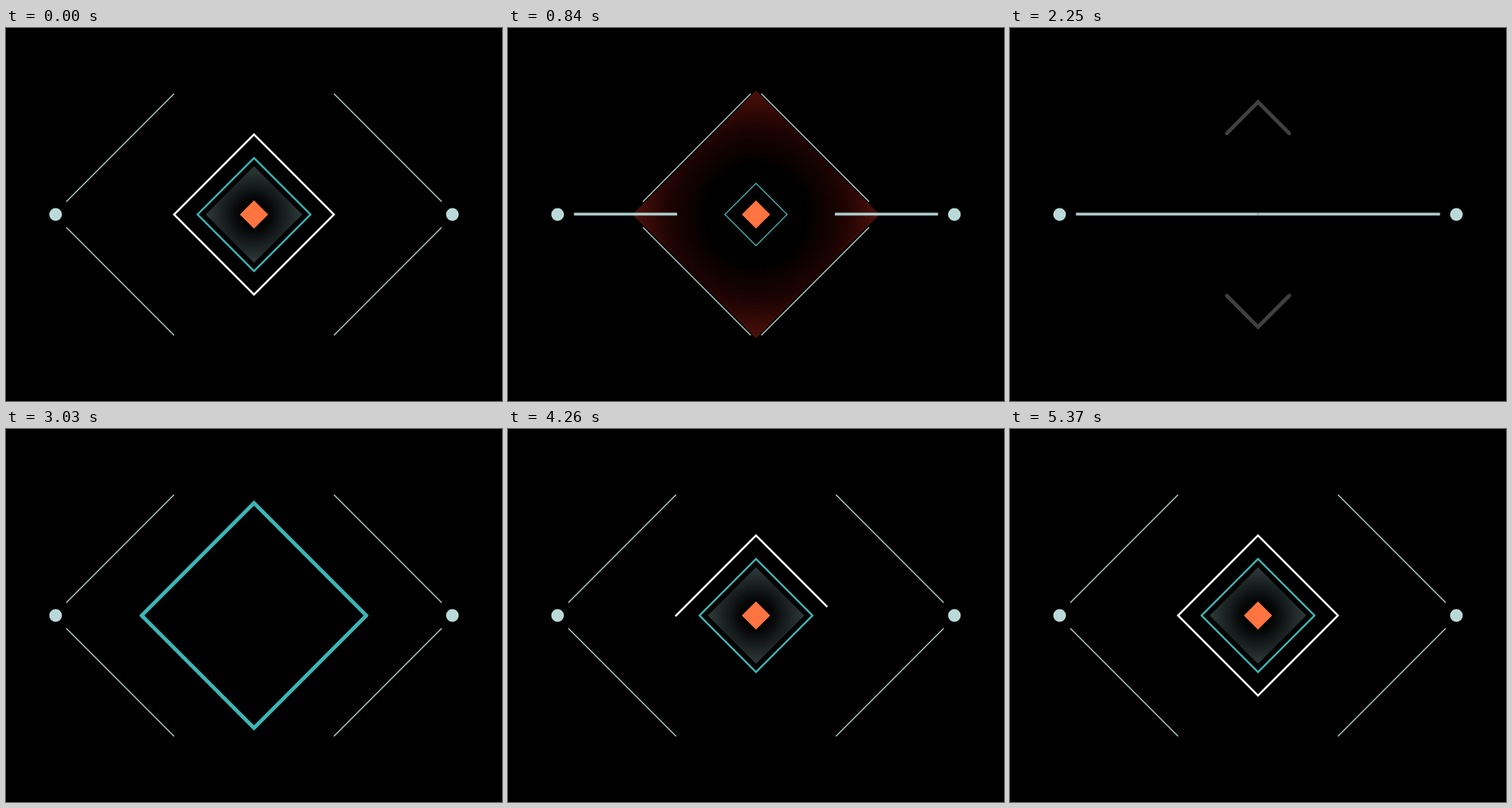
Recreate the animation shown at these times as an HTML page. Size 658x494 px, loop 5.4 s.

```html
<!DOCTYPE html>
<html lang="en">
<head>
<meta charset="utf-8">
<title>Diamond loop</title>
<style>
  html, body { margin: 0; width: 100%; height: 100%; overflow: hidden; background: #000; }
  svg { display: block; width: 100vw; height: 100vh; }
</style>
</head>
<body>
<svg viewBox="0 0 658 494">
  <defs>
    <radialGradient id="ember" gradientUnits="userSpaceOnUse" cx="0" cy="0" r="164">
      <stop offset=".4" stop-color="#000"/>
      <stop offset=".72" stop-color="#1f0403"/>
      <stop offset="1" stop-color="#4d100a"/>
    </radialGradient>
    <radialGradient id="smoke" gradientUnits="userSpaceOnUse" cx="0" cy="0" r="64">
      <stop offset=".25" stop-color="#000"/>
      <stop offset="1" stop-color="#303b3b"/>
    </radialGradient>
  </defs>
  <g id="stage" transform="translate(329 247)" fill="none"></g>
</svg>
<script>
const LOOP = 5400;
const IN_OUT = 'cubic-bezier(.48,0,.52,1)';
const OUT = 'cubic-bezier(.3,.8,.6,1)';
const PALE = '#badad9', TEAL = '#3cb6b6';
const stage = document.getElementById('stage');
const startTime = document.timeline.currentTime ?? 0;

function add(tag, attrs, parent = stage) {
  const el = document.createElementNS('http://www.w3.org/2000/svg', tag);
  for (const key in attrs) el.setAttribute(key, attrs[key]);
  parent.appendChild(el);
  return el;
}

// Each step is [ms, value, easing towards the next step].
function move(el, prop, steps) {
  const last = steps[steps.length - 1];
  const all = [...steps];
  if (steps[0][0] > 0) all.unshift([0, steps[0][1]]);
  if (last[0] < LOOP) all.push([LOOP, last[1]]);
  const frames = all.map(([ms, value, easing = 'linear']) =>
    ({ offset: ms / LOOP, [prop]: value, easing }));
  el.animate(frames, { duration: LOOP, iterations: Infinity }).startTime = startTime;
}

const diamond = r => `M${-r} 0L0 ${-r}L${r} 0L0 ${r}Z`;
const mirror = (x, y) => add('g', { transform: `scale(${x} ${y})` });

const ember = add('path', { d: diamond(164), fill: 'url(#ember)' });
move(ember, 'opacity', [[0, 0], [600, 0], [840, 1], [1620, 1], [1830, 0]]);

const smoke = add('path', { d: diamond(64), fill: 'url(#smoke)' });
move(smoke, 'opacity', [[0, 1], [420, 0], [3600, 0], [3930, 1]]);
move(smoke, 'transform', [
  [0, 'scale(1)', IN_OUT], [570, 'scale(.5)'], [3600, 'scale(.5)', OUT], [3960, 'scale(1)']
]);

// Slanted outer strokes
for (const x of [1, -1]) for (const y of [1, -1]) {
  const line = add('path', {
    d: 'M-249 -17L-106 -160', stroke: '#b4d3cd', 'stroke-width': 1.5,
    pathLength: 1, 'stroke-dasharray': '1 2'
  }, mirror(x, y));
  move(line, 'transform', [
    [0, 'translateX(0px)', IN_OUT], [840, 'translateX(99px)'],
    [2000, 'translateX(99px)'], [2000, 'translateX(0px)']
  ]);
  move(line, 'opacity', [[0, 1], [1620, 1], [1830, 0], [2280, 0], [2280, 1]]);
  move(line, 'strokeDashoffset', [
    [0, 0], [2000, 0], [2000, 1], [2280, 1, IN_OUT], [2790, 0]
  ]);
}

// Horizontal bars and end dots
for (const side of [1, -1]) {
  const half = mirror(side, 1);
  const anchor = add('g', { transform: 'translate(-241.5 -.5)' }, half);
  const bar = add('rect', { y: -1.75, width: 241.5, height: 3.5, fill: PALE }, anchor);
  move(bar, 'transform', [
    [0, 'scaleX(0)', IN_OUT], [840, 'scaleX(.567)'],
    [1620, 'scaleX(.567)', IN_OUT], [1860, 'scaleX(1)'],
    [2250, 'scaleX(1)', IN_OUT], [2760, 'scaleX(0)']
  ]);
  add('circle', { cx: -263.2, r: 8.4, fill: PALE }, half);
}

// Teal diamond, drawn outwards from its top and bottom corners
const teal = add('g', {});
for (const y of [1, -1]) {
  const chevron = add('path', {
    d: 'M-149 0L0 -149L149 0', transform: `scale(1 ${y})`, 'stroke-width': 5,
    'stroke-linecap': 'round', pathLength: 2
  }, teal);
  move(chevron, 'strokeDasharray', [
    [0, '2 4'], [2000, '2 4'], [2000, '.556 4'], [2250, '.556 4', IN_OUT], [2910, '2 4']
  ]);
  move(chevron, 'strokeDashoffset', [
    [0, 0], [2000, 0], [2000, -.722], [2250, -.722, IN_OUT], [2910, 0]
  ]);
  move(chevron, 'stroke', [
    [0, TEAL], [2000, TEAL], [2000, '#404040'], [2250, '#404040'], [2550, TEAL]
  ]);
}
move(teal, 'opacity', [[0, 1], [1620, 1], [1830, 0], [2245, 0], [2245, 1]]);
move(teal, 'transform', [
  [0, 'scale(.503)', IN_OUT], [570, 'scale(.277)'], [2000, 'scale(.277)'],
  [2000, 'scale(1)'], [3140, 'scale(1)', IN_OUT], [3720, 'scale(.503)']
]);

const white = add('path', {
  d: diamond(106), stroke: '#fff', 'stroke-width': 2.6, 'stroke-linecap': 'square',
  pathLength: 4, 'stroke-dasharray': '4 5'
});
move(white, 'transform', [
  [0, 'scale(1)', IN_OUT], [600, 'scale(2)'], [2000, 'scale(2)'], [2000, 'scale(1)']
]);
move(white, 'opacity', [[0, 1], [600, 0], [3960, 0], [3960, 1]]);
move(white, 'strokeDashoffset', [[0, 0], [2000, 0], [2000, 4], [3960, 4, OUT], [5370, 0]]);

const core = add('path', { d: diamond(18.8), fill: '#ff7440' });
move(core, 'transform', [
  [0, 'scale(1)'], [1620, 'scale(1)', IN_OUT], [1860, 'scale(0)'],
  [3420, 'scale(0)', OUT], [3840, 'scale(1)']
]);
</script>
</body>
</html>
```
